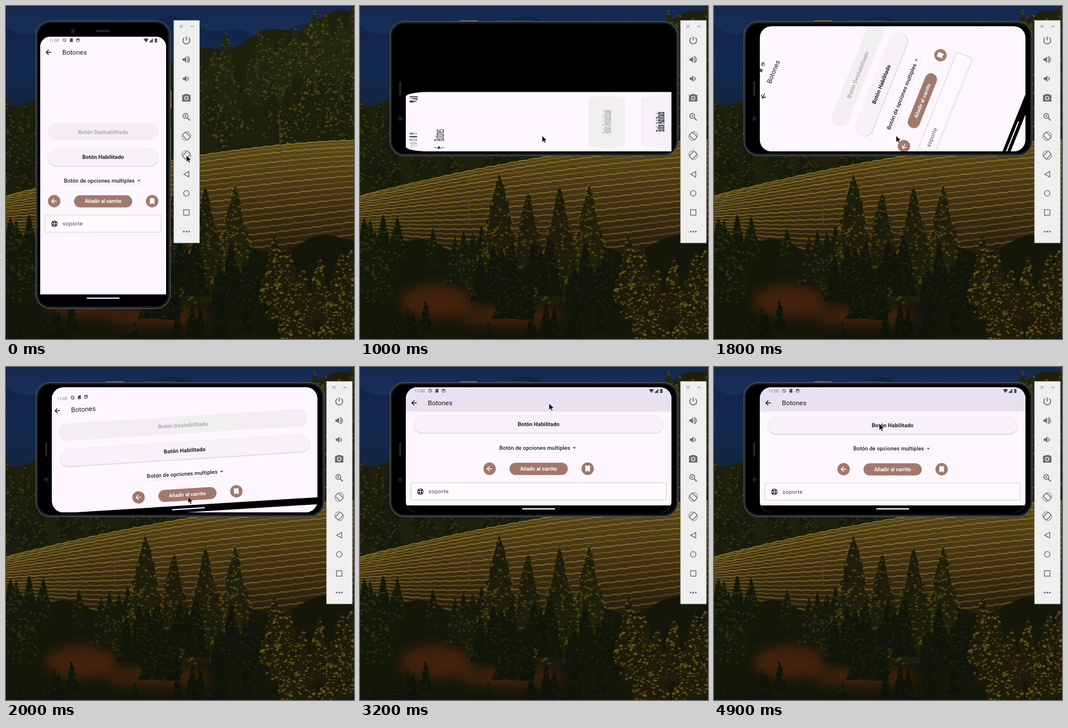
These frames come from a looping animation (600x575 px, 5 s). An HTML page with a canvas:

```html
<!DOCTYPE html>
<html lang="es">
<head>
<meta charset="utf-8">
<title>Botones</title>
<style>
html, body { margin: 0; width: 100%; height: 100%; overflow: hidden; background: #12160b; }
canvas, svg { position: absolute; left: 0; top: 0; width: 600px; height: 575px; }
text { font-family: Roboto, sans-serif; fill: #1d1b20; }
</style>
</head>
<body>
<canvas id="scene" width="600" height="575"></canvas>
<svg id="stage" viewBox="0 0 600 575"></svg>
<script>
// ---------- landscape behind the emulator ----------
const c = document.getElementById('scene').getContext('2d');
let seed = 41;
const rnd = (a = 0, b = 1) => a + (b - a) * ((seed = seed * 16807 % 2147483647) / 2147483647);

function grad(y0, y1, ...cols) {
  const g = c.createLinearGradient(0, y0, 0, y1);
  cols.forEach((col, i) => g.addColorStop(i / (cols.length - 1), col));
  return g;
}

function trace(f) {
  c.beginPath();
  for (let x = 0; x <= 600; x += 6) c.lineTo(x, f(x));
}

// fills everything below the curve f
function land(f, fill) {
  trace(f);
  c.lineTo(600, 575);
  c.lineTo(0, 575);
  c.fillStyle = fill;
  c.fill();
}

function tree(x, top, w, h, dark, lit) {
  c.fillStyle = dark;
  c.beginPath();
  for (let i = -12; i <= 12; i++) {
    const k = 1 - Math.abs(i) / 12;
    c.lineTo(x + Math.sign(i) * w / 2 * (1 - k) ** 0.8 * rnd(0.65, 1), top + h * (1 - k));
  }
  c.fill();
  c.globalAlpha = 0.65;
  for (let n = w * h / 55; n > 0; n--) {
    const k = Math.sqrt(rnd()), u = rnd(-1, 1), r = rnd(1.2, 3.2);
    c.fillStyle = rnd() < 0.8 - 0.55 * k - 0.2 * u ? lit : dark;
    c.beginPath();
    c.ellipse(x + u * w / 2 * k ** 0.8, top + h * k, r, r * 0.6, u * 0.6, 0, 7);
    c.fill();
  }
  c.globalAlpha = 1;
}

// n trees with random places, drawn from far to near
function grove(n, [x0, x1], [y0, y1], size, dark, lit) {
  for (let i = 0; i < n; i++) {
    const s = size * rnd(0.75, 1.25);
    tree(rnd(x0, x1), y0 + (y1 - y0) * (i + rnd()) / n, s * 0.5, s, dark, lit);
  }
}

function pole(x, y, h) {
  c.strokeStyle = '#57432a';
  c.lineWidth = 1.5;
  c.beginPath();
  c.moveTo(x, y); c.lineTo(x + 1, y + h);
  c.moveTo(x - 6, y + 5); c.lineTo(x + 6, y + 4);
  c.stroke();
}

function paintScene() {
  c.fillStyle = grad(0, 200, '#14284f', '#1b3864', '#182a3c');
  c.fillRect(0, 0, 600, 575);
  land(x => 35 + 14 * Math.sin(x / 55) + 6 * Math.sin(x / 17), 'rgba(14,32,62,.55)');
  land(x => 170 - 0.27 * x + 8 * Math.sin(x / 19), '#1e200d');
  grove(26, [330, 605], [35, 110], 95, '#1f250f', '#4a4818');
  grove(9, [485, 605], [-6, 40], 90, '#23260f', '#5a501a');
  grove(30, [330, 605], [110, 185], 72, '#1c1f0c', '#584e18');
  grove(20, [-5, 58], [155, 250], 75, '#1a1d0c', '#4b4318');
  grove(34, [0, 310], [225, 275], 50, '#171a0b', '#40380f');

  const top = x => 232 + 96 * (1 - x / 600) ** 1.6;
  const low = x => 405 + 30 * Math.sin(Math.PI * x / 600);
  land(top, grad(235, 440, '#5d4a1a', '#432f13', '#21190b'));
  for (let i = 0; i < 20; i++) {
    const k = (i / 19) ** 1.2;
    c.strokeStyle = i % 2 ? '#70691f' : '#8f832a';
    c.globalAlpha = 0.9 - 0.5 * k;
    c.lineWidth = 1.6 + k;
    trace(x => top(x) + (low(x) - top(x)) * k + 0.7 * Math.sin(x / 3 + i));
    c.stroke();
  }
  c.globalAlpha = 1;
  pole(472, 194, 76);
  pole(187, 331, 46);

  land(x => low(x) - 8 + 10 * Math.sin(x / 23), '#14160a');
  c.filter = 'blur(10px)';
  c.fillStyle = '#43220c';
  c.beginPath();
  c.ellipse(130, 510, 62, 28, 0, 0, 7);
  c.ellipse(260, 535, 90, 16, 0, 0, 7);
  c.fill();
  c.filter = 'none';
  grove(12, [0, 75], [355, 410], 85, '#14180a', '#36350f');
  grove(10, [120, 230], [375, 425], 75, '#15180a', '#3d3910');
  tree(240, 290, 84, 165, '#1d1d0b', '#655719');
  grove(5, [275, 365], [305, 350], 140, '#1b1c0b', '#574b16');
  tree(395, 307, 90, 185, '#1f200b', '#675a1a');
  grove(16, [190, 440], [395, 450], 85, '#11140a', '#27280e');
  grove(20, [0, 420], [500, 560], 55, '#0f1309', '#20220d');
  grove(18, [430, 600], [395, 500], 110, '#1e1b0a', '#76621e');
}

// ---------- phone, app and toolbar ----------
const svg = document.getElementById('stage');
const brown = '#a1786c', ink = '#1d1b20', paper = '#fef7ff', grey = '#6a6a6a';
const box = (x, y, w, h, r, attrs) => `<rect x="${x}" y="${y}" width="${w}" height="${h}" rx="${r}" ${attrs}/>`;
const dot = (r, attrs, x = 0, y = 0) => `<circle cx="${x}" cy="${y}" r="${r}" ${attrs}/>`;
const ring = (col, w) => `fill="none" stroke="${col}" stroke-width="${w}"`;
const line = (d, col, w) => `<path d="${d}" ${ring(col, w)}/>`;
const shape = (d, col) => `<path d="${d}" fill="${col}"/>`;
const label = (x, y, size, str, attrs = '') => `<text x="${x}" y="${y}" font-size="${size}" ${attrs}>${str}</text>`;
const at = (x, y, body) => `<g transform="translate(${x} ${y})">${body}</g>`;
const spin = (n, body) => Array.from({ length: n }, (_, i) => `<g transform="rotate(${45 + 360 * i / n})">${body}</g>`).join('');
const mid = 'text-anchor="middle" letter-spacing=".1"';
const arrow = col => line('M4.2 0H-4M0 -4.2L-4.2 0L0 4.2', col, 1.3);

// left edge, right edge and top of the screen
const header = (l, r, y) =>
  label(l + 15, y + 9.2, 7.2, '11:00', 'style="fill:#77737a"') +
  at(l + 42, y + 6, dot(2.8, ring('#66626a', 1)) + line('M-2 -2L2 2', '#66626a', 1)) +
  at(l + 53.5, y + 6, shape('M-1 -3.2H2.6V3.2H-2.6V-1.6Z', '#55515a')) +
  at(l + 65, y + 6, dot(2.8, ring('#66626a', 1)) + shape('M-2.8 0A2.8 2.8 0 0 1 2.8 0Z', '#66626a')) +
  at(r - 34.5, y + 6.3, shape('M-4.4 -2Q0 -5 4.4 -2L0 3.4Z', '#4b474f')) +
  at(r - 26, y + 6.3, shape('M3.4 -3.6V3.4H-3.6Z', '#4b474f')) +
  box(r - 19.5, y + 3, 4, 7, 0.7, 'fill="#4b474f"') +
  at(l + 14.5, y + 27, arrow(ink)) +
  label(l + 38, y + 31.2, 11.5, 'Botones');

// centre, vertical shift, half widths of buttons and card
const content = (m, dy, hb, hc) => at(m, dy,
  box(-hb, 202, hb * 2, 30, 15, 'fill="#f2eff2"') +
  label(0, 220.7, 9.3, 'Botón Deshabilitado', mid + ' font-weight="600" style="fill:#aeaaaf"') +
  box(-hb, 247, hb * 2, 30.3, 15, 'fill="#d3ced6"') +
  box(-hb, 246, hb * 2, 30, 15, 'fill="#f7f2fa" stroke="#ebe6ee" stroke-width=".6"') +
  label(0, 264.3, 9.4, 'Botón Habilitado', mid + ' font-weight="600"') +
  label(-67.8, 304.7, 9.4, 'Botón de opciones multiples', 'letter-spacing=".1" font-weight="500"') +
  shape('M58.8 300.2h5.4l-2.7 2.9z', '#4b474f') + line('M-68 309.2H66.5', '#e9e3ea', 0.8) +
  at(-84.5, 337, dot(10.7, `fill="${brown}"`) + arrow('#fff')) +
  box(-50.3, 326.8, 100.6, 21, 10.5, `fill="${brown}"`) +
  label(0, 340.3, 8.6, 'Añadir al carrito', mid + ' font-weight="700" style="fill:#fff"') +
  at(84.5, 337, dot(10.7, `fill="${brown}"`) + shape('M-4 -5.2H4V5.4L0 3.5L-4 5.4Z', '#fff')) +
  box(-hc, 361, hc * 2, 29.6, 2.5, 'fill="#fffaff" stroke="#e8e0d8" stroke-width="1.7"') +
  at(16 - hc, 376, dot(4.9, ring(ink, 1.1)) + dot(2, ring(ink, 1)) + spin(4, line('M2.1 0H5.1', ink, 2.4))) +
  label(30 - hc, 379.2, 9.5, 'soporte', 'letter-spacing=".3" style="fill:#49454f"'));

const pill = (x, y) => box(x - 28.5, y - 1, 57, 2, 1, 'fill="#fff"');

const shell =
  box(282, 146, 3, 31, 1, 'fill="#c18a44"') + box(282, 209, 3, 60, 1, 'fill="#3c3e42"') +
  box(51.7, 25.7, 231.6, 496.6, 25, 'fill="#16181c" stroke="#50545c" stroke-width="1.4"') +
  box(54.5, 28.5, 226, 491, 22.5, 'fill="#000" stroke="#262a30"') +
  at(115.5, 43.5, dot(5, 'fill="#0d0f13"') + dot(2, 'fill="#2a303a"')) +
  box(155, 41.5, 25, 3.5, 1.7, 'fill="#24262a"');

const tall = shape('M59 498V70A17 17 0 0 1 76 53H259A17 17 0 0 1 276 70V498Z', paper) +
  box(59, 498, 217, 13, 0, '') + pill(167.5, 504.5) + header(59, 276, 53) + content(167.5, 0, 95.5, 100);

const wide = box(79, 35, 458, 204, 0, `fill="${paper}"`) +
  `<g clip-path="url(#pane)"><g id="list">${content(308, -117, 215.5, 220)}</g></g>` +
  box(79, 35, 458, 42, 0, 'id="tint" fill="#e7e1f2"') + header(79, 537, 35) +
  box(79, 239, 458, 12, 0, '') + pill(308, 245);

const speaker = shape('M-6 -2H-3.2L.3 -5.4V5.4L-3.2 2H-6Z', grey) + line('M2 -2.8A3.2 3.2 0 0 1 2 2.8', grey, 1.5);
const turn = flip => `<g transform="scale(${flip} 1)">` +
  box(-3.9, -6.2, 7.8, 12.4, 1, 'transform="rotate(-45)" ' + ring(grey, 1.4)) +
  line('M0 -7.8A7.8 7.8 0 0 1 7.8 0M0 7.8A7.8 7.8 0 0 1 -7.8 0', grey, 1) + '</g>';
const icons = [
  line('M-3.6 -4.8A6 6 0 1 0 3.6 -4.8M0 -7V0', grey, 1.6),
  at(-0.6, 0, speaker + line('M2 -5.4A5.6 5.6 0 0 1 2 5.4', grey, 1.4)),
  speaker,
  shape('M-3 -6.6H3L4.4 -5H7.2V6.4H-7.2V-5H-4.4Z', grey) + dot(3, 'fill="#6a6a6a" stroke="#efefef" stroke-width="1.4"', 0, 0.6),
  dot(4.2, ring(grey, 1.4), -1.6, -1.6) + line('M1.6 1.6L6.2 6.2', grey, 1.9) + line('M-3.6 -1.6H.4M-1.6 -3.6V.4', grey, 1),
  turn(1),
  turn(-1),
  line('M-4.4 0L4.3 -4.9V4.9Z', grey, 1.3),
  dot(4.8, ring(grey, 1.3)),
  box(-4.7, -4.7, 9.4, 9.4, 0, ring(grey, 1.3)),
  [-4.5, 0, 4.5].map(x => dot(1.5, `fill="${grey}"`, x)).join('')
];
const tools = box(289.3, 25, 44.2, 384, 0, 'fill="#efefef" stroke="#c9c9c9" stroke-width=".8"') +
  line('M299.6 32.7l5 5m0 -5l-5 5M318 35.2h5.6', '#777', 1) +
  icons.map((body, i) => at(311, 59.5 + 33 * i, body)).join('');

svg.innerHTML =
  `<defs><clipPath id="glass">${box(79, 35, 458, 216, 20, 'id="glassBox"')}</clipPath>` +
  `<clipPath id="pane">${box(79, 77, 458, 162, 0, '')}</clipPath></defs>` +
  `<g id="shell">${shell}</g><g id="screen">${box(79, 35, 458, 216, 0, `id="back" fill="${paper}"`)}` +
  `<g id="tall">${tall}</g><g id="wide">${wide}</g></g><g id="tools">${tools}</g>` +
  '<path id="mouse" d="M0 0V11.2L2.6 8.8L4.5 12.8L6.3 12L4.5 8.1H8.2Z" stroke="#fff" stroke-width=".6"/>';

// ---------- motion ----------
const set = (id, name, v) => document.getElementById(id).setAttribute(name, v);
const ramp = (t, a, b) => Math.min(1, Math.max(0, (t - a) / (b - a)));

// cubic-bezier(.4, 0, .2, 1)
function fastOut(k) {
  let a = 0, b = 1, s;
  for (let i = 0; i < 20; i++) {
    s = (a + b) / 2;
    if (1.2 * s * (1 - s) ** 2 + 0.6 * s * s * (1 - s) + s ** 3 < k) a = s; else b = s;
  }
  return s * s * (3 - 2 * s);
}

// pointer moves: start, end, x, y
const turnAt = 800, spinAt = 1700, dragAt = 2650, dropAt = 3250, maxScroll = 43.5;
const moves = [[50, 450, 314, 224], [2000, 2600, 319, 172], [dragAt, 3200, 326, 63], [3300, 3900, 99, 58], [4000, 4900, 285, 98]];

const pointer = t => moves.reduce(([x, y], [a, b, u, v]) => {
  const k = ramp(t, a, b);
  return [x + (u - x) * k, y + (v - y) * k];
}, [311, 258]);

function draw(t) {
  const upright = t < turnAt, squeezed = !upright && t < spinAt - 100;
  const angle = -90 * (1 - fastOut(ramp(t, spinAt, spinAt + 400)));
  const fade = ramp(t, spinAt + 100, spinAt + 250);
  const [mx, my] = pointer(t);

  set('shell', 'transform', upright ? '' : 'matrix(0 -1 1 0 26 310)');
  set('tools', 'transform', upright ? '' : 'translate(263.5 0)');
  set('screen', 'clip-path', upright ? 'none' : 'url(#glass)');
  set('glassBox', 'rx', squeezed ? 0 : 20);
  set('back', 'opacity', upright || squeezed ? 0 : 1);
  set('tall', 'opacity', 1 - fade);
  set('tall', 'transform', upright ? '' : squeezed ? 'matrix(0 -.472 2.111 0 -32.9 278.8)'
    : `translate(308 143) rotate(${angle}) translate(-167.5 -282)`);
  set('wide', 'opacity', fade);
  set('wide', 'transform', `rotate(${angle} 308 143)`);

  // the list follows the drag, then stretches past its end and springs back
  const drag = t < dragAt ? 0 : 172 - pointer(Math.min(t, dropAt))[1];
  const over = Math.max(0, drag - maxScroll) * (1 - fastOut(ramp(t, dropAt, dropAt + 250)));
  const stretch = 1 + 0.00022 * over;
  set('list', 'transform', `translate(0 ${239 * (1 - stretch)}) scale(1 ${stretch}) translate(0 ${-Math.min(drag, maxScroll)})`);
  set('tint', 'opacity', ramp(t, dragAt + 30, dragAt + 230));
  set('mouse', 'transform', `translate(${mx} ${my})`);
}

paintScene();
function tick() {
  draw(performance.now() % 5000);
  requestAnimationFrame(tick);
}
tick();
</script>
</body>
</html>
```
